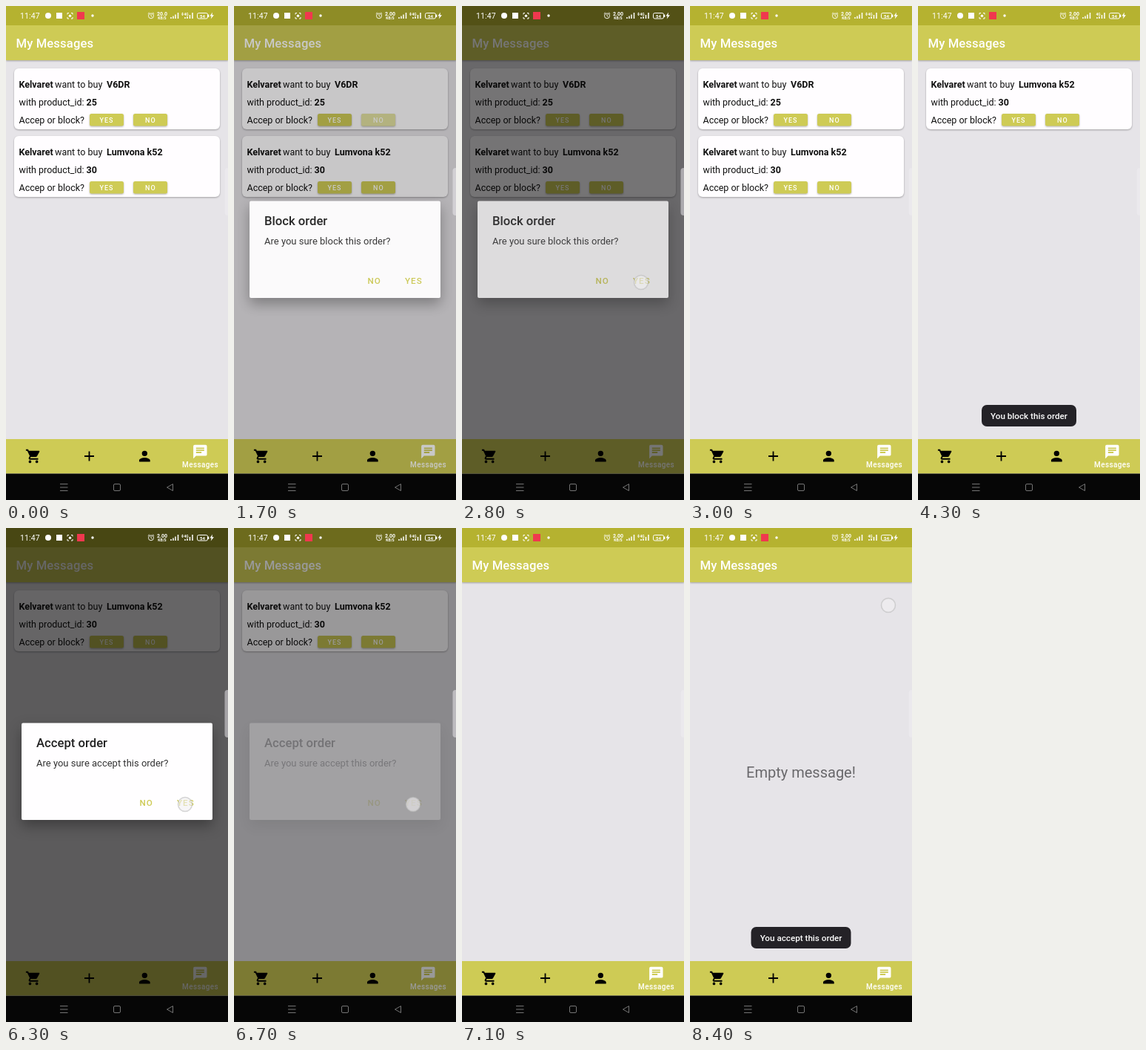
Animation of 300x665 px, one loop 8500 ms. Source, as an HTML page:

```html
<!DOCTYPE html>
<html lang="en">
<head>
<meta charset="utf-8">
<style>
  html, body { margin: 0; height: 100%; overflow: hidden; background: #060606; }
  svg { display: block; width: 100vw; height: 100vh; font-family: Roboto, sans-serif; }
  text { white-space: pre; }
  .body { font-size: 12.5px; fill: #111; }
  .b { font-weight: 700; }
  .m { font-weight: 500; }
  .btn { font-size: 9px; font-weight: 500; letter-spacing: 1px; fill: #fff; }
  .action { font-size: 11.67px; font-weight: 500; letter-spacing: 1px; fill: #cecb55; }
  .toast { font-size: 11.67px; font-weight: 500; fill: #fff; text-anchor: middle; }
  .lift { filter: drop-shadow(0 1px 1px rgba(0, 0, 0, .3)); }
  #box rect { filter: drop-shadow(0 8px 9px rgba(0, 0, 0, .32)); }
</style>
</head>
<body>
<svg viewBox="0 0 300 665" preserveAspectRatio="none">
  <defs>
    <g id="btn"><rect class="lift" width="46" height="16.5" rx="2.5" fill="#cecb55"/></g>
  </defs>

  <rect width="300" height="630" fill="#e6e4e8"/>
  <g id="cards"></g>
  <text id="empty" x="150" y="336" font-size="20" fill="#69686b" text-anchor="middle">Empty message!</text>

  <rect class="lift" y="20" width="300" height="53" fill="#cecb55"/>
  <rect width="300" height="26" fill="#b5b230"/>
  <text class="m" x="13.5" y="56" font-size="16.67" letter-spacing=".1" fill="#fff">My Messages</text>

  <rect y="583" width="300" height="46.5" fill="#cecb55"/>
  <path transform="translate(26 595) scale(.92)" d="M7 18a2 2 0 1 0 0 4 2 2 0 0 0 0-4zM1 2v2h2l3.6 7.6-1.35 2.4C4.5 15.400 5.500 17 7 17h12v-2H7.400l-.2-.35.9-1.650h7.450c.75 0 1.410-.4 1.750-1l3.600-6.500c.35-.7-.1-1.500-.9-1.500H5.200l-.94-2zM17 18a2 2 0 1 0 0 4 2 2 0 0 0 0-4z"/>
  <path d="M112.500 599.500v13M106 606h13" stroke="#000" stroke-width="1.8"/>
  <path transform="translate(176.300 595) scale(.92)" d="M12 12a4 4 0 1 0 0-8 4 4 0 0 0 0 8zm0 2c-2.700 0-8 1.300-8 4v2h16v-2c0-2.700-5.300-4-8-4z"/>
  <path transform="translate(251.300 589) scale(.92)" fill="#fff" d="M20 2H4a2 2 0 0 0-2 2v18l4-4h14a2 2 0 0 0 2-2V4a2 2 0 0 0-2-2zM6 9h12v2H6zm8 5H6v-2h8zm4-6H6V6h12z"/>
  <text class="m" x="262.500" y="621" font-size="10" letter-spacing=".35" fill="#fff" text-anchor="middle">Messages</text>

  <rect id="dim" width="300" height="629.500"/>
  <g id="box">
    <rect x="21" y="262.500" width="258" height="130.500" rx="2" fill="#fffeff"/>
    <text id="ask" class="m" x="41" y="295" font-size="16.67" fill="#222"></text>
    <text id="sure" x="41" y="320.500" font-size="13" fill="#333"></text>
    <text class="action" x="180.500" y="374">NO</text>
    <text class="action" x="231" y="374">YES</text>
  </g>

  <g id="toast">
    <rect y="537" height="29" rx="7" fill="#242227"/>
    <text class="toast" x="150" y="556"></text>
  </g>
  <rect x="295.500" y="218" width="9" height="64" rx="4" fill="#f0eef2" opacity=".5"/>
  <circle id="dot" r="9.500" fill="#f2f0f2" fill-opacity=".6" stroke="#bbb" stroke-opacity=".6" stroke-width="1.500"/>

  <g fill="#fff">
    <text x="19" y="17" font-size="10.500" letter-spacing=".1">11:47</text>
    <circle cx="57" cy="13" r="4"/>
    <rect x="68" y="9" width="8" height="8"/>
    <path d="M83 11.500V9.500h2M88 9.500h2v2M90 15v2h-2M85 17h-2v-2" fill="none" stroke="#fff"/>
    <circle cx="86.500" cy="13.200" r="1.700"/>
    <rect x="96" y="8" width="10" height="10" fill="#f0384e"/>
    <circle cx="117" cy="13" r="1.700"/>
    <path d="M199.500 13.300a3.500 3.500 0 1 1-7 0 3.500 3.500 0 1 1 7 0M196 11v2.500l1.500 1M191.800 10.500l2-1.700M200.200 10.500l-2-1.700" fill="none" stroke="#fff" stroke-width=".9"/>
    <g text-anchor="middle" class="b">
      <text id="rate" x="211" y="13" font-size="7"></text>
      <text x="211" y="18" font-size="5">KB/S</text>
      <text x="265.500" y="15.500" font-size="6">54</text>
    </g>
    <text class="b" x="240.500" y="12.500" font-size="5">4G</text>
    <path id="data" d="M237 10.500l1.500-2 1.500 2zM237 11.200l1.500 2 1.500-2z"/>
    <path d="M223 17v-2M226 17v-3.500M229 17v-5.500M232.500 17v-8M242 17v-2M245 17v-3M248.500 17v-5M252 17v-8" stroke="#fff" stroke-width="1.500"/>
    <rect x="258.500" y="9.500" width="14" height="7.500" rx="2" fill="none" stroke="#fff"/>
    <rect x="273" y="11.500" width="1.300" height="3.500"/>
    <path d="M279 8.500l-3.500 5h2.200l-1 4 4.300-5.300h-2.500z"/>
  </g>

  <rect y="629.500" width="300" height="36" fill="#060606"/>
  <path d="M73 643.500h10.500M73 648h10.500M73 652.500h10.500M147 643.500h6a1.500 1.500 0 0 1 1.500 1.500v6a1.500 1.500 0 0 1-1.500 1.500h-6a1.500 1.500 0 0 1-1.500-1.500v-6a1.500 1.500 0 0 1 1.500-1.500zM225.500 643.500v9l-8-4.500z" fill="none" stroke="#747474" stroke-linejoin="round"/>
</svg>

<script>
const LOOP = 8500, STEP = 100;
const $ = id => document.getElementById(id);
const ramp = (t, start, length) => Math.min(1, Math.max(0, (t - start) / length));
const within = (t, a, b) => t >= a && t < b;

const orders = [
  { item: 'V6DR', id: 25, gone: 3400 },
  { item: 'Lumvona k52', id: 30, gone: 7100 },
];
const dialogs = [
  { verb: 'Block', open: 1600, close: 2780 },
  { verb: 'Accept', open: 4800, close: 6630 },
];
const toasts = [
  { text: 'You block this order', width: 128, show: 3400, hide: 5400 },
  { text: 'You accept this order', width: 135, show: 7100, hide: LOOP },
];
const taps = [
  { x: 195, y: 153, from: 1400, to: 1600 },
  { x: 242, y: 372, from: 2800, to: 2900 },
  { x: 136, y: 153, from: 4600, to: 4800 },
  { x: 242, y: 372, from: 6300, to: 6800 },
  { x: 268, y: 104, from: 8100, to: LOOP },
];

const button = (x, label, textX) => `
  <use href="#btn" x="${x}" y="145"/>
  <text class="btn" x="${textX}" y="157.3">${label}</text>`;

$('cards').innerHTML = orders.map(o => `<g>
  <rect class="lift" x="11" y="84" width="278" height="82" rx="6" fill="#fffdff"/>
  <text class="body b" x="17.5" y="110.3">Kelvaret</text>
  <text class="body" x="66" y="110.3">want to buy</text>
  <text class="body b" x="136" y="110.3">${o.item}</text>
  <text class="body" x="17.5" y="134">with product_id: <tspan class="b" x="108.5">${o.id}</tspan></text>
  <text class="body" x="17.5" y="157.5">Accep or block?</text>
  ${button(113, 'YES', 126.5)}${button(172, 'NO', 188)}
</g>`).join('') +
  '<rect id="ripple" y="145" width="46" height="16.5" rx="2.5" fill="#fff"/>';

function draw(t) {
  let row = 0;
  orders.forEach((o, i) => {
    const card = $('cards').children[i], here = t < o.gone;
    card.style.display = here ? '' : 'none';
    card.setAttribute('transform', `translate(0 ${row * 91})`);
    if (here) row++;
  });
  $('empty').style.opacity = t >= 7200 ? 1 : 0;

  const d = dialogs[t < 3400 ? 0 : 1];
  $('ask').textContent = d.verb + ' order';
  $('sure').textContent = `Are you sure ${d.verb.toLowerCase()} this order?`;
  $('dim').style.opacity = .6 * (ramp(t, d.open, 280) - ramp(t, d.close, 210));
  $('box').style.opacity = ramp(t, d.open, 105) - ramp(t, d.close, 88);

  const note = toasts[t < 6300 ? 0 : 1], [plate, words] = $('toast').children;
  plate.setAttribute('x', 150 - note.width / 2);
  plate.setAttribute('width', note.width);
  words.textContent = note.text;
  $('toast').style.opacity = ramp(t, note.show, 400) - ramp(t, note.hide, 500);

  const tap = taps.find(p => within(t, p.from, p.to));
  $('dot').style.opacity = tap ? 1 : 0;
  if (tap) $('dot').setAttribute('transform', `translate(${tap.x} ${tap.y})`);

  const first = t < 3400, pressed = first ? 1400 : 4600;
  $('ripple').setAttribute('x', first ? 172 : 113);
  $('ripple').style.opacity = within(t, pressed, pressed + 500) ? .45 * (1 - ramp(t, pressed + 300, 200)) : 0;

  $('rate').textContent = t < 1000 ? '20.0' : '2.00';
  $('data').style.opacity = t < 4300 || within(t, 6300, 7200) ? 1 : 0;
}

function frame(now) {
  draw(Math.floor(now % LOOP / STEP) * STEP);
  requestAnimationFrame(frame);
}
draw(0);
requestAnimationFrame(frame);
</script>
</body>
</html>
```
